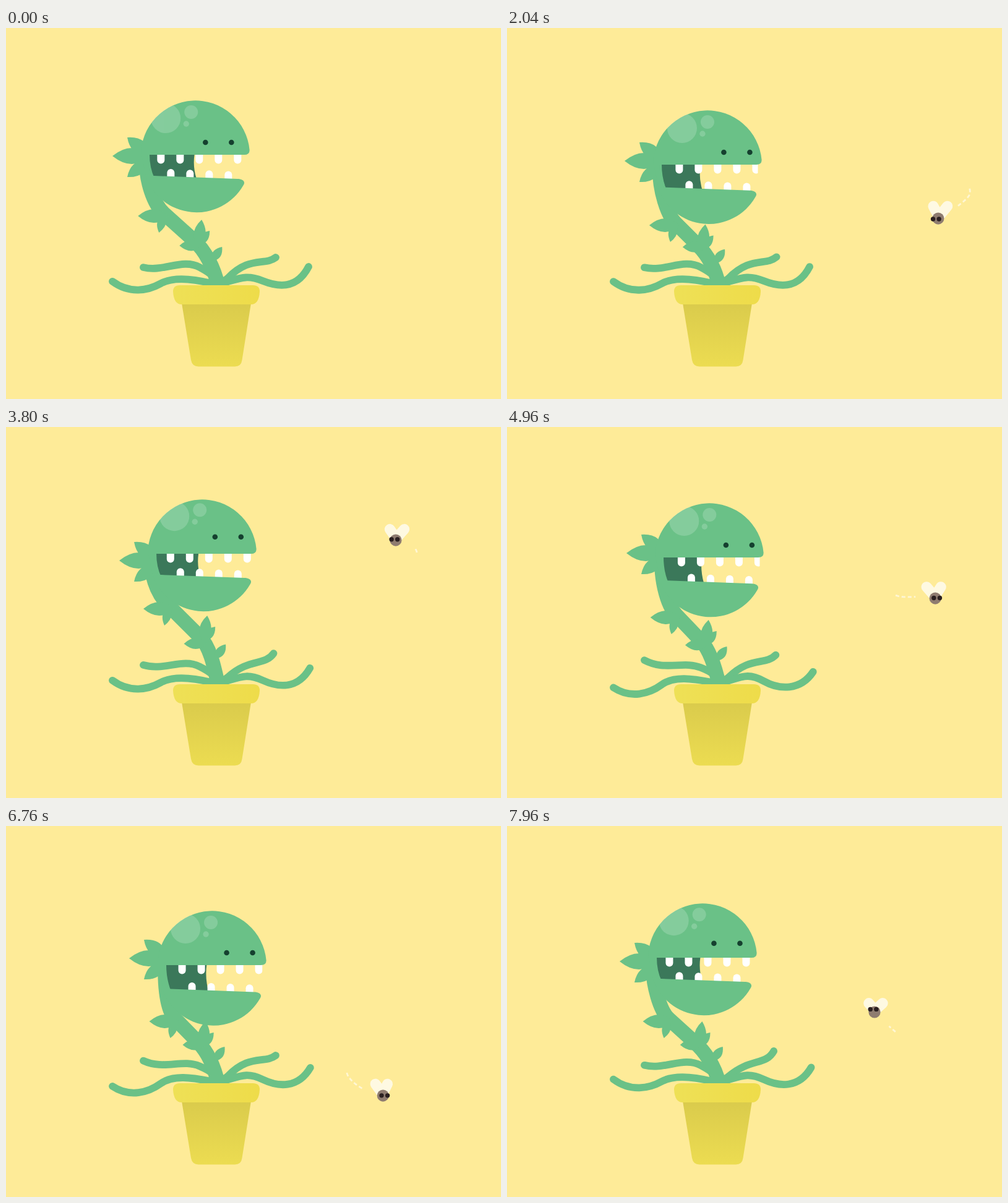
Recreate the animation shown at these times as an HTML page. Size 800 px wide and 600 px high, loop 8 s.

```html
<!DOCTYPE html>
<html lang="en">
<head>
<meta charset="utf-8">
<title>Plant and fly</title>
<style>
html, body { margin: 0; width: 100%; height: 100%; overflow: hidden; background: #feeb98; }
svg { display: block; width: 100%; height: 100%; }
.line { fill: none; stroke: #6ac187; stroke-width: 11.8; stroke-linecap: round; }
.green { fill: #6ac187; }
.white { fill: #fff; }
</style>
</head>
<body>
<svg viewBox="0 0 800 600" xmlns="http://www.w3.org/2000/svg">
  <defs>
    <linearGradient id="potFill" x1="0" y1="0" x2="0" y2="1">
      <stop offset="0" stop-color="#dacb4c"/><stop offset="1" stop-color="#ecdc51"/>
    </linearGradient>
    <linearGradient id="rimFill">
      <stop offset="0" stop-color="#eee056"/><stop offset="1" stop-color="#eedc4a"/>
    </linearGradient>
    <clipPath id="skull"><circle r="88"/></clipPath>
    <clipPath id="bite"><rect x="-74" y="-2" width="155.5" height="60"/></clipPath>
  </defs>
  <rect width="800" height="600" fill="#feeb98"/>
  <g id="arms"></g>
  <path id="neck" class="line" style="stroke-width:23.500"/>
  <path id="leaves" class="green"/>
  <g id="head">
    <path id="tail" class="green"/>
    <path class="green" d="M-87 0H-62V38H-79Z"/>
    <path id="throat" fill="#3b785a"/>
    <g clip-path="url(#bite)"><g id="upper" class="white"></g><g id="lower" class="white"></g></g>
    <path class="green" d="M-88 1A88 88 0 0 1 87.6 -8Q88 0 79 0L-74 0V1Z"/>
    <path id="jaw" class="green" d="M-80 33.5L-67 34L68 39C76 39 82 43 77.500 49.500A87 87 0 0 1 -80.4 34Z"/>
    <g clip-path="url(#skull)"><g id="shine" fill="#fff" opacity=".18">
      <circle r="24"/><circle cx="41" cy="-10" r="11"/><circle cx="33" cy="9" r="4.7"/>
    </g></g>
    <g id="eyes" fill="#15402f"><circle cx="-21" r="4.3"/><circle cx="21" r="4.3"/></g>
  </g>
  <path d="M284 445H396L381.5 537Q380 547.5 370 547.5H311Q301 547.5 299 537Z" fill="url(#potFill)"/>
  <path d="M281 416H399Q410 416 410 426Q409 447 396 447H284Q271 447 270 426Q270 416 281 416Z" fill="url(#rimFill)"/>
  <path id="trail" fill="none" stroke="#fff" stroke-opacity=".58" stroke-width="2.8" stroke-dasharray="6 4"/>
  <g id="fly">
    <path id="wings" fill="none" stroke="#fff" stroke-width="17" stroke-linecap="round" stroke-linejoin="round" opacity=".72"/>
    <circle r="9.6" fill="#8f7c70"/>
    <g id="flyEyes" fill="#2b2021"><circle cx="-4.8" r="3.7"/><circle cx="4.8" r="3.7"/></g>
  </g>
</svg>
<script>
const LOOP = 8000;
const TRAIL_AGE = 340;
const NS = "http://www.w3.org/2000/svg";
const $ = id => document.getElementById(id);

// time, head x, head y, tilt, stem height
const POSES = [
  [0, 306, 205, 0, 304], [1160, 320, 211, -1, 309], [2040, 324, 221, -8, 319],
  [2850, 296, 211, -2, 306], [3800, 317, 205, 9, 294], [4960, 327, 211, -9, 308],
  [6760, 333, 225, -13, 316], [7400, 297, 216, -3, 318], [7960, 316, 213, 4, 316]
];

// time, x, y
const FLIGHT = [
  [0, 900, 150], [480, 796, 126], [820, 729, 134], [1160, 713, 209],
  [1780, 748, 268], [2040, 697, 308], [2520, 645, 318], [3460, 664, 203],
  [3800, 630, 183], [4300, 596, 235], [4620, 628, 272], [4960, 692, 277],
  [5200, 712, 308], [5800, 600, 342], [6420, 551, 399], [6760, 609, 436],
  [7100, 745, 430], [7620, 628, 333], [7960, 594, 301]
];

// Smooth Hermite curve through timed points
function track(rows, t) {
  const last = rows.length - 1;
  if (t <= rows[0][0]) return rows[0].slice(1);
  if (t >= rows[last][0]) return rows[last].slice(1);
  let i = 0;
  while (rows[i + 1][0] <= t) i++;
  const a = rows[i], b = rows[i + 1];
  const before = rows[Math.max(0, i - 1)], after = rows[Math.min(last, i + 2)];
  const h = b[0] - a[0], u = (t - a[0]) / h, v = 1 - u;
  return a.slice(1).map((p, k) => {
    const q = b[k + 1];
    const m = (q - before[k + 1]) / (b[0] - before[0]) * h;
    const n = (after[k + 1] - p) / (after[0] - a[0]) * h;
    return p * (1 + 2 * u) * v * v + m * u * v * v + q * u * u * (3 - 2 * u) - n * u * u * v;
  });
}

const clamp = (x, lo, hi) => Math.min(hi, Math.max(lo, x));
const wave = (t, period, shift = 0) => Math.cos(2 * Math.PI * (t / period - shift));
const move = (el, x, y) => el.setAttribute("transform", `translate(${x} ${y})`);
const draw = (el, d) => el.setAttribute("d", d);

function addPath(parent, attrs) {
  const el = document.createElementNS(NS, "path");
  for (const k in attrs) el.setAttribute(k, attrs[k]);
  return $(parent).appendChild(el);
}

function leaf(bx, by, tx, ty, bulge) {
  const dx = tx - bx, dy = ty - by, len = Math.hypot(dx, dy);
  const mx = bx + dx * 0.46, my = by + dy * 0.46;
  const nx = -dy / len * bulge, ny = dx / len * bulge;
  return `M${bx} ${by}Q${mx + nx} ${my + ny} ${tx} ${ty}Q${mx - nx} ${my - ny} ${bx} ${by}Z`;
}

const arms = [0, 1, 2, 3].map(() => addPath("arms", { class: "line" }));
for (let i = 0; i < 5; i++) addPath("upper", { d: `M${i * 31 - 6} -1h12v9.5a6 6 0 0 1 -12 0z` });
const lowerTeeth = [0, 1, 2, 3].map(() => addPath("lower", { d: "M-6 6V-6a6 6 0 0 1 12 0V6z" }));

// Each arm swings at its own pace; e, f, g, h are distances from rest
function drawArms(t) {
  const e = 5 - 5.5 * wave(t, 2000, 0.06);
  const f = 6.5 - 6 * wave(t, 2000, 0.95);
  const g = 3.5 - 3.5 * wave(t, 2260);
  const h = 6 - 6 * wave(t, 2100);
  [
    `M222 ${387 - e}C255 395 285 ${372 + e * 0.6} 313 ${387 + e * 0.2}S335 405 338 412`,
    `M172 ${409 + f}C200 ${430 + f * 0.8} 230 ${424 + f * 0.6} 250 ${413 + f * 0.3}S300 ${405 + f * 0.15} 332 413`,
    `M${436 - g * 0.7} ${371 - g}C418 ${385 + g * 0.4} 393 ${368 + g} 358 405L346 414`,
    `M${489 + h * 0.58} ${386 + h}C${470 + h * 0.4} ${423 + h * 0.4} 440 ${419 + h * 0.6} 415 ${409 + h * 0.2}S380 404 352 412`
  ].forEach((d, i) => draw(arms[i], d));
}

function drawStem(x, y, turn, tilt, stem) {
  const ax = 213 + (x - 306) * 0.45 + (turn - 37) * 0.85;
  const by = 310 + (stem - 304) * 0.5;
  const bx = 316 + (ax - 213) * 0.6 - (by - 310) * 0.75;

  const sx = x - 80 - tilt * 0.3, sy = y + 5;
  const px = ax + 42, py = stem - 4, qx = bx - 12, qy = by + 34;
  const dx = (qx - px) * 0.34, dy = (qy - py) * 0.34;
  draw($("neck"), `M${sx} ${sy}C${sx} ${sy + 38} ${px - dx} ${py - dy} ${px} ${py}` +
    `C${px + dx} ${py + dy} ${qx - dx} ${qy - dy} ${qx} ${qy}` +
    `C${qx + dx} ${qy + dy} 336 386 343 418`);

  const cx = 285 + (bx - 322) * 0.8, cy = 353 + (by - 313) * 0.3;
  const ex = 353 + (bx - 322) * 0.65, ey = 355 + (by - 312) * 0.5;
  draw($("leaves"),
    leaf(ax + 49, stem, ax, stem, 22) +
    leaf(ax + 42, stem - 4, ax + 34, stem + 27, 14) +
    leaf(bx - 6, by + 43, bx, by, 19) +
    leaf(bx - 6, by + 41, bx + 13, by + 18, 14) +
    leaf(cx + 37, cy - 1, cx, cy, 18) +
    leaf(ex - 17, ey + 23, ex, ey, 14));
}

function drawHead(x, y, turn, tilt) {
  const up = Math.max(0, tilt), gap = Math.max(0, -tilt * 0.35);
  move($("head"), x, y);
  draw($("tail"),
    leaf(-74, tilt, -110, -28 + tilt, 22) +
    leaf(-74, 2 + tilt, -134, 2 + tilt, 26) +
    leaf(-76, 10 + tilt, -110, 36 + tilt, 20));
  const edge = 36 - turn, low = 38 + gap;
  draw($("throat"), `M-74 -1Q-74 ${low * 0.55} -66 ${low}H${edge + 3}Q${edge - 3} ${low * 0.5} ${edge} -1Z`);
  move($("upper"), turn - 93, 0);
  lowerTeeth.forEach((tooth, i) => {
    const tx = turn - 77 + i * 31;
    move(tooth, tx, 36.5 + gap + tx * 0.036);
  });
  move($("jaw"), 0, gap);
  move($("shine"), -48 + (turn - 37) * 0.67, -59 - up * 0.2);
  move($("eyes"), turn, -20 - up * 0.8);
}

function drawPlant(t) {
  const [x, y, tilt, stem] = track(POSES, t);
  // The face turns towards the fly once it has arrived
  const look = (track(FLIGHT, t)[0] - 600) * Math.min(1, t / 1000);
  const turn = 37.3 + (x - 306) * 0.25 + look * 0.058;
  drawStem(x, y, turn, tilt, stem);
  drawHead(x, y, turn, tilt);
}

function drawFly(t) {
  const [x, y] = track(FLIGHT, t);
  const [bx, by] = track(FLIGHT, t - 40);
  const ox = clamp((x - bx) * 0.55, -3.5, 2.5);
  const oy = clamp((y - by) * 0.75, -4.5, 4);
  const spread = 10.7 + Math.sin(t / 23);
  move($("fly"), x, y);
  move($("flyEyes"), ox, oy - 2);
  draw($("wings"), `M${-ox - spread} ${-17 - oy}L${-ox * 0.3} -3L${-ox + spread} ${-17 - oy}`);

  const points = [];
  for (let age = TRAIL_AGE; age > 0; age -= 10) {
    const [px, py] = track(FLIGHT, t - age);
    if (Math.hypot(px - x, py - y) < 32) break;
    points.push(px.toFixed(1) + " " + py.toFixed(1));
  }
  draw($("trail"), points.length > 1 ? "M" + points.join("L") : "");
}

const start = performance.now();
function tick() {
  const t = (performance.now() - start) % LOOP;
  drawArms(t);
  drawPlant(t);
  drawFly(t);
  requestAnimationFrame(tick);
}
tick();
</script>
</body>
</html>
```
